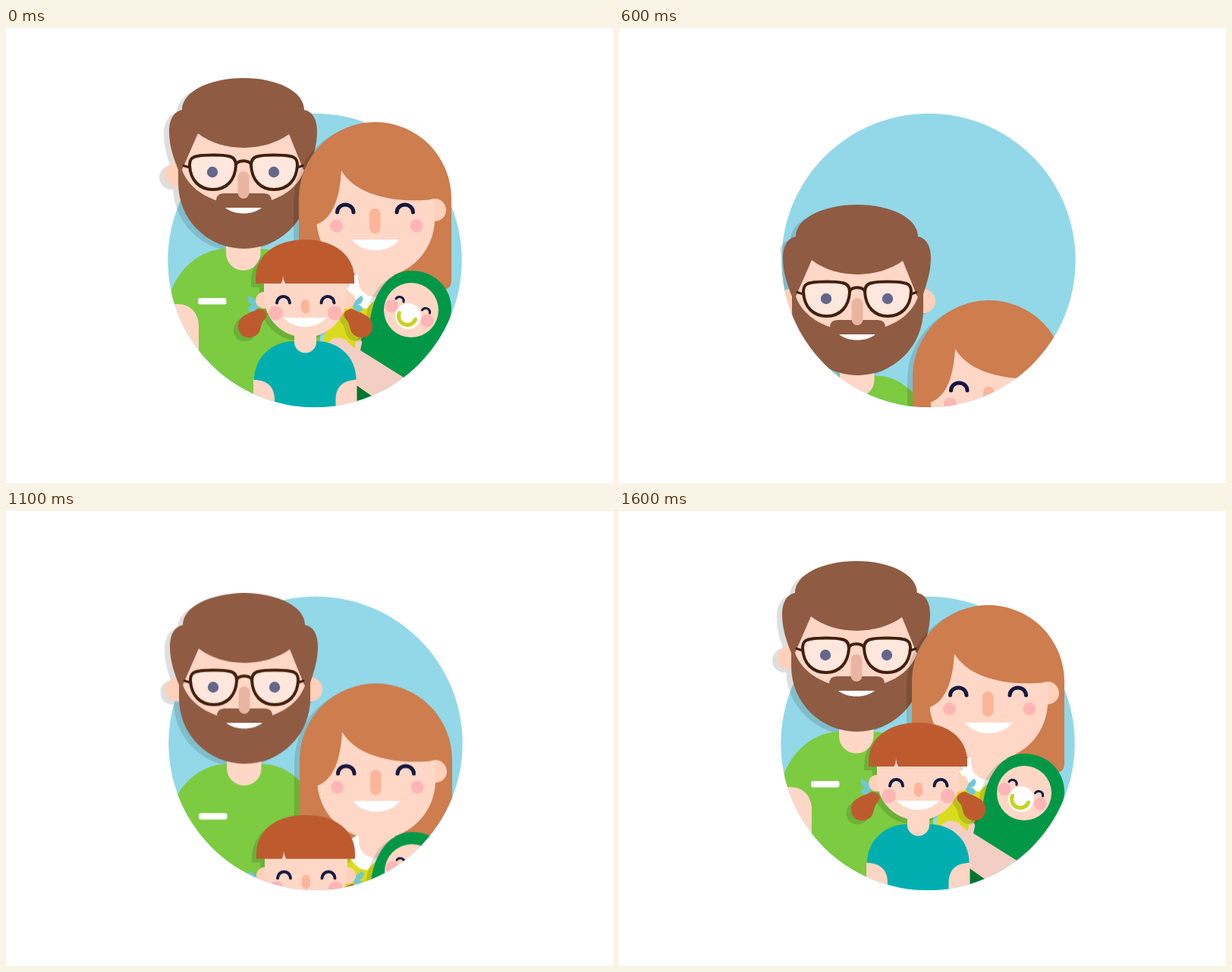
An HTML page that plays this animation: 800x600 px, repeating every 6600 ms.

```html
<!DOCTYPE html>
<html lang="en">
<head>
<meta charset="utf-8">
<title>Family portrait</title>
<style>
html, body { margin: 0; width: 100%; height: 100%; overflow: hidden; background: #fff; }
svg { display: block; width: 100vw; height: 100vh; }

.skin { fill: #ffd7c7; }
.ear { fill: #ffd0ba; }
.cheek { fill: #ffb5b6; }
.nose { fill: #fcb598; }
.white { fill: #fff; }
.beard { fill: #8f5b43; }
.ginger { fill: #cd7d4e; }
.red { fill: #bd5b2f; }
.green { fill: #7ccb41; }
.blanket { fill: #009846; }
.lime { fill: #d9dc1d; }
.teal { fill: #00aeb0; }
.bow { fill: #6ec8d5; }
.shadow { opacity: .13; }
.eyes, .frames, .ring { fill: none; stroke-linecap: round; }
.eyes { stroke: #15173f; }
.frames { stroke: #41200b; stroke-width: 4; }
.ring { stroke: #c8d320; stroke-width: 5; }

/* Motion is held for 100 ms per step */
.stage, .dad, .mom, .girl { animation: 6600ms infinite step-end; }
.stage { animation-name: nudge; }
.dad { animation-name: dad; }
.mom { animation-name: mom; }
.girl { animation-name: girl; }

@keyframes nudge {
  0%, 24.242%, 100% { transform: translateX(0); }
  1.515% { transform: translateX(1px); }
}
@keyframes dad {
  0% { transform: translateY(0); }
  1.515% { transform: translateY(455px); animation-timing-function: steps(2); }
  4.545% { transform: translateY(328px); animation-timing-function: steps(2); }
  7.575% { transform: translateY(214px); animation-timing-function: steps(1); }
  9.09% { transform: translateY(167px); animation-timing-function: steps(3); }
  13.636% { transform: translateY(85px); animation-timing-function: steps(3); }
  18.181% { transform: translateY(21px); animation-timing-function: steps(2); }
  21.212%, 100% { transform: translateY(0); }
}
@keyframes mom {
  0% { transform: translateY(0); }
  1.515% { transform: translateY(440px); animation-timing-function: steps(2); }
  4.545% { transform: translateY(362px); animation-timing-function: steps(3); }
  9.09% { transform: translateY(235px); animation-timing-function: steps(3); }
  13.636% { transform: translateY(148px); animation-timing-function: steps(3); }
  18.181% { transform: translateY(81px); animation-timing-function: steps(2); }
  21.212% { transform: translateY(12px); animation-timing-function: steps(2); }
  24.242%, 100% { transform: translateY(0); }
}
@keyframes girl {
  0% { transform: translateY(0); }
  1.515% { transform: translateY(330px); animation-timing-function: steps(5); }
  9.09% { transform: translateY(230px); animation-timing-function: steps(3); }
  13.636% { transform: translateY(159px); animation-timing-function: steps(3); }
  18.181% { transform: translateY(103px); animation-timing-function: steps(2); }
  21.212% { transform: translateY(58px); animation-timing-function: steps(2); }
  24.242%, 100% { transform: translateY(0); }
}
</style>
</head>
<body>
<svg viewBox="0 0 800 600" role="img" aria-label="A family of four rising into a round portrait">
  <defs>
    <!-- Open above the middle, round below -->
    <clipPath id="porthole">
      <path d="M202 0V225C203 262 212 285 213.3 306.5A193.7 193.7 0 0 0 600.7 306.5V0Z"/>
    </clipPath>

    <path id="dadHair" d="M232 108C232 84 268 66 313 66S393 84 393 108C404 110 410 120 410 137C410 155 404 172 399 187H392L373 140C340 164 285 164 253 139L232 187H227C221 172 215 155 215 137C215 119 222 110 232 108Z"/>
    <path id="dadJaw" d="M227 180V205A86.5 86 0 0 0 400 205V180Z"/>
    <g id="dadEars"><circle cx="225" cy="193" r="16"/><circle cx="400" cy="193" r="16"/></g>
    <path id="lens" d="M252 169C262 167 285 167 293 169C300 170 303 174 303 181C302 201 290 213 273 213C255 213 243 201 242 181C242 173 245 170 252 169Z"/>

    <path id="momHair" d="M386 345V225A100.5 101 0 0 1 587 225V333Q587 345 575 345Z"/>
    <path id="wrap" d="M534 320C565 320 587 343 587 370C587 398 552 458 520 500H428L480 385C485 347 505 320 534 320Z"/>

    <path id="girlHair" d="M329 337V330C329 300 355 279 394 279S459 300 459 330V337Z"/>
    <path id="girlFace" d="M340 330V353.5A54.5 54.5 0 0 0 449 353.5V330Z"/>
    <path id="tail" d="M333 370C344 372 346 378 341 384C335 390 337 396 333 402C327 411 306 412 306 393C306 379 320 377 333 370Z"/>
    <g id="bow"><path d="M333 363L321 353Q316 356 321 363Q327 366 333 363Z"/><path d="M333 364Q325 362 319 369Q319 375 325 374Q331 372 333 364Z"/></g>
    <path id="girlArm" d="M326 464C345 464 354 474 354 490V860H326Z"/>
  </defs>

  <g class="stage">
    <circle cx="407" cy="306.5" r="193.7" fill="#93d8e8"/>
    <g clip-path="url(#porthole)">

      <g class="dad">
        <g class="shadow" transform="translate(-7 4)">
          <use href="#dadHair"/><use href="#dadJaw"/><use href="#dadEars"/>
        </g>
        <path class="green" d="M212 800V370C216 330 248 291 292 291H334C376 291 404 325 414 370V800Z"/>
        <path class="skin" d="M200 364H226C243 364 254 376 254 394V800H200Z"/>
        <rect class="white" x="253" y="356" width="37.500" height="8.500" rx="3"/>
        <path class="skin" d="M290 270V297A22.700 22.700 0 0 0 335.500 297V270Z"/>
        <use href="#dadEars" class="ear"/>
        <use href="#dadJaw" class="beard"/>
        <path class="skin" d="M250 130L231 184C240 215 275 233 313 233S386 215 394 184L376 130Z"/>
        <use href="#dadHair" class="beard"/>
        <path class="beard" d="M277 242V228Q277 218 287 218H340Q350 218 350 228V242Z"/>
        <rect x="305.500" y="189" width="15" height="36" rx="7.500" fill="#e9b4a1"/>
        <path class="white" d="M289 237H337C325 247 301 247 289 237Z"/>
        <g fill="#fff" fill-opacity=".4">
          <use href="#lens"/><use href="#lens" transform="matrix(-1 0 0 1 626 0)"/>
        </g>
        <g fill="#65678a"><circle cx="272" cy="190" r="7.200"/><circle cx="353" cy="190" r="7.200"/></g>
        <g class="frames">
          <use href="#lens"/><use href="#lens" transform="matrix(-1 0 0 1 626 0)"/>
          <path d="M303 180C306 173.500 320 173.500 323 180"/>
          <path d="M242 184L234 181.500M384 184L391 181.500" stroke-width="3"/>
        </g>
      </g>

      <g class="mom">
        <use href="#momHair" class="shadow" transform="translate(-7 4)"/>
        <use href="#momHair" class="ginger"/>
        <path class="lime" d="M400 800C400 420 420 345 465 333H515L560 500V800Z"/>
        <path class="white" d="M466 323C453 326 446 338 450 346C454 360 463 370 475 370L487 358L500 370C514 368 525 350 524 338L508 323Z"/>
        <path class="skin" d="M464 300V332A22.700 22.700 0 0 0 509.500 332V300Z"/>
        <circle class="ear" cx="565" cy="240" r="15"/>
        <path class="skin" d="M442 188C460 218 505 232 565 226V247A78 78 0 0 1 409.500 259C432 250 440 222 442 188Z"/>
        <path class="eyes" stroke-width="5" d="M436.500 243A10.700 10 0 0 1 458 243M515 243A10.700 10 0 0 1 536.500 243"/>
        <g class="cheek"><circle cx="435.500" cy="261" r="8.500"/><circle cx="541" cy="261" r="8.500"/></g>
        <rect class="nose" x="479" y="238" width="14.500" height="33" rx="7"/>
        <path class="white" d="M456 279H518.500C504 298 470 298 456 279Z"/>

        <use href="#wrap" class="shadow" transform="translate(-7 4)"/>
        <use href="#wrap" class="blanket"/>
        <path d="M438 448L483 486L468 510H425Z" fill="#00752f"/>
        <path d="M424 416C430 407 440 407 447 411L459 422L461 414C463 409 470 410 469 416L467 425L526 462L483 486L425 445Z" fill="#f3cec2"/>
        <circle class="skin" cx="534" cy="372" r="36"/>
        <g class="cheek"><circle cx="508" cy="367" r="8.500"/><circle cx="555" cy="386" r="8.500"/></g>
        <circle class="white" cx="530" cy="380" r="17"/>
        <g transform="rotate(22 529 380)">
          <path class="ring" d="M517.500 380A11.500 11.500 0 0 0 540.500 380"/>
        </g>
        <path class="eyes" stroke-width="3" d="M514 357A5.500 5.500 0 0 1 524 361M548.500 372A5.500 5.500 0 0 1 558.500 376"/>
      </g>

      <g class="girl">
        <g class="shadow" transform="translate(-6 5)">
          <use href="#girlHair"/><use href="#girlFace"/><use href="#tail"/>
          <use href="#tail" transform="matrix(-1 0 0 1 789 0)"/>
        </g>
        <g id="sides">
          <use href="#tail" class="red"/><use href="#bow" class="bow"/>
          <circle class="ear" cx="340" cy="359" r="11"/>
        </g>
        <use href="#sides" transform="matrix(-1 0 0 1 789 0)"/>
        <path class="teal" d="M327 860V464C327 435 350 413 380 413H409C440 413 461.500 435 461.500 464V860Z"/>
        <g fill="#fdd5c4">
          <use href="#girlArm"/><use href="#girlArm" transform="matrix(-1 0 0 1 788.500 0)"/>
        </g>
        <path class="skin" d="M380 395V414A14.500 14.500 0 0 0 409 414V395Z"/>
        <use href="#girlFace" class="skin"/>
        <use href="#girlHair" class="red"/>
        <path class="skin" d="M362 337.500Q365 334 365 326Q366 334 368.500 337.500Z"/>
        <path class="eyes" stroke-width="4" d="M357 362.500A8.500 8.500 0 0 1 374 362.500M415.500 362.500A8.500 8.500 0 0 1 432.500 362.500"/>
        <g class="cheek"><circle cx="355.500" cy="376" r="9.500"/><circle cx="433.500" cy="376" r="9.500"/></g>
        <rect class="nose" x="389" y="358" width="11" height="18.500" rx="5.500"/>
        <path class="white" d="M366 382H422C409 398 379 398 366 382Z"/>
      </g>

    </g>
  </g>
</svg>
</body>
</html>
```
